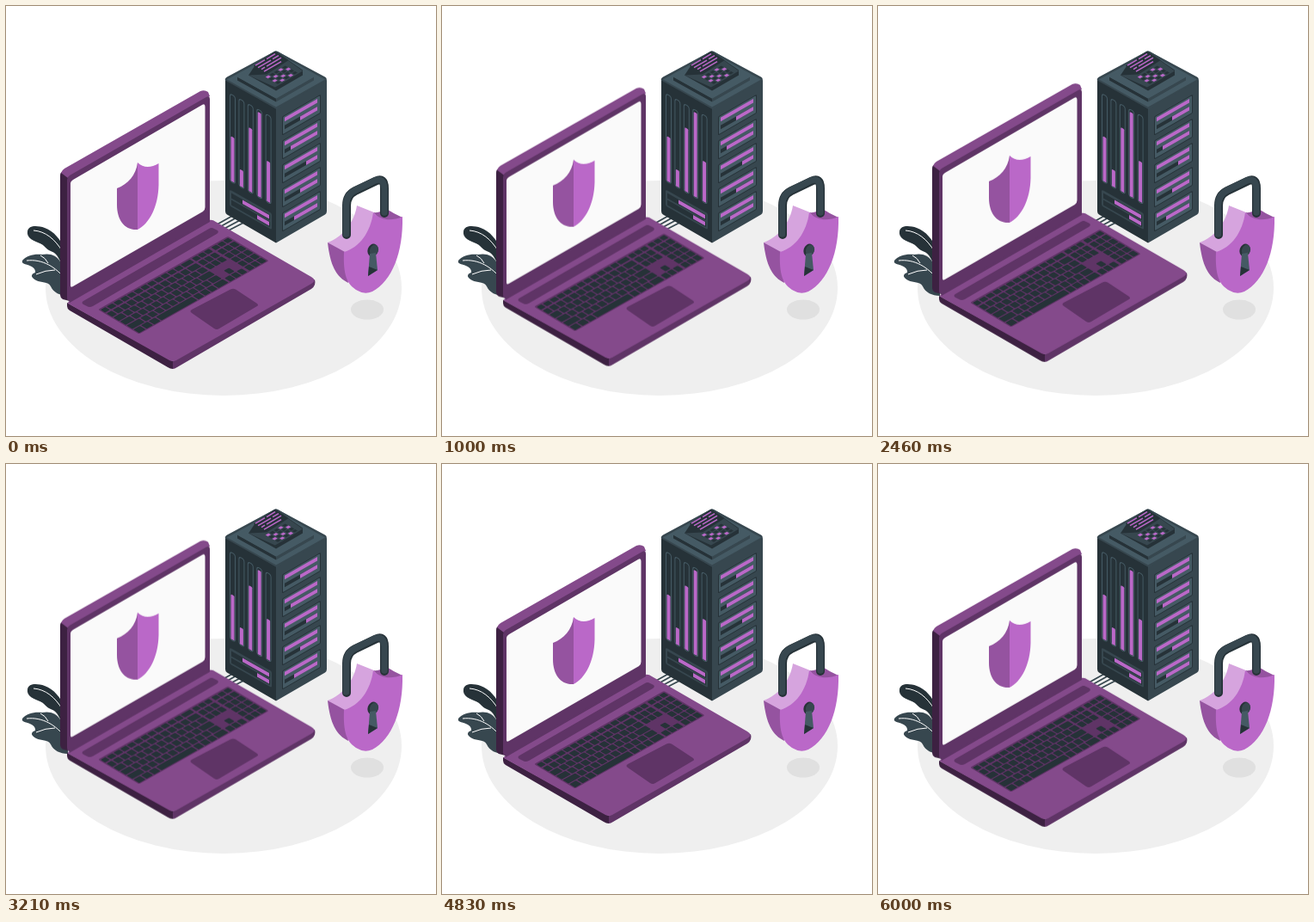
These frames come from a looping animation (500 px wide and 500 px high, 6040 ms). An HTML page:

```html
<!DOCTYPE html>
<html lang="en">
<head>
<meta charset="utf-8">
<title>Data protection</title>
<style>
  html, body { margin: 0; width: 100%; height: 100%; overflow: hidden; background: #fff; }
  svg { display: block; width: 100vw; height: 100vh; }
</style>
</head>
<body>
<svg viewBox="0 0 500 500">
  <ellipse cx="253" cy="328" rx="207" ry="125" fill="#efefef"/>

  <g id="plant">
    <path fill="#263238" d="M25 262C26 255 36 255 45 258C56 262 63 271 69 284V306C62 299 62 288 52 285C46 283 46 278 37 275C29 272 24 268 25 262Z"/>
    <path fill="#37474f" d="M19 296C24 290 33 288 42 289C51 287 59 290 63 297C68 302 71 309 72 316V337C63 337 55 333 52 326C49 320 41 322 35 319C29 316 28 312 34 310C35 305 29 302 25 301C21 300 18 299 19 296Z"/>
    <path fill="none" stroke="#fff" stroke-width="1" d="M32 261C46 262 57 271 66 286M24 296C42 294 58 303 70 319M40 290Q46 293 49 299M35 312Q46 307 57 307"/>
  </g>

  <path fill="none" stroke="#37474f" stroke-width="1.7" d="M240 257L265 243M243 260L270 245M247 262.500L275 247.500M251 265L280 250"/>

  <g id="server" transform="translate(0 .6)">
    <path fill="#455a64" d="M255 86L311 53Q314 51 317 53L373 86L314 121Z"/>
    <path fill="#263238" d="M255 87Q255 84 258 86L314 119V275L257 242Q255 241 255 238Z"/>
    <path fill="#37474f" d="M314 119L370 85Q373 84 373 87V238Q373 241 371 242L314 275Z"/>
    <path fill="#37474f" d="M255 86Q254 84 257 82L311 53Q314 51 317 53L371 82Q374 84 372 87L314 119Z"/>
    <path fill="#455a64" d="M257 85L314 54L371 85L314 117Z"/>
    <path fill="#263238" d="M269 82L314 107V111L269 86Z"/>
    <path fill="#37474f" d="M314 107L358 82V86L314 111Z"/>
    <path fill="#455a64" d="M269 82L314 57L358 82L314 107Z"/>
    <path fill="#263238" d="M282 80L290 68L313 52L345 74V80L314 98Z"/>
    <path fill="#37474f" d="M282 80L303 79L328 63L345 75L313 94Z"/>
    <path fill="#263238" d="M288 69L313 54L328 62L303 78Z"/>
    <path fill="none" stroke="#ba68c8" stroke-width="1.6" d="M290 68.500L301 62M303 61L313 55M293 71L308 62.500M310 61L317 57M297 73L301 70.500M303 69.500L320 59.500M300 75.500L320 64"/>
    <g id="pad" transform="matrix(.87 -.5 .87 .5 300 82)"></g>
    <g id="left" transform="matrix(1 .565 0 1 255 86)"></g>
    <g id="right" transform="matrix(1 -.575 0 1 314 119)"></g>
  </g>

  <g id="lock">
    <ellipse cx="420" cy="353" rx="19" ry="11.500" fill="#e0e0e0"/>
    <path fill="#9553a0" d="M427 240Q436 241 441 235Q450 241 461 246L440 254Z"/>
    <path fill="#d6a4de" d="M374 275C391 269 405 252 408 232L428 240C425 264 412 282 393 287Z"/>
    <path fill="#9553a0" d="M374 275L394 286L398 322C384 315 377 302 374 275Z"/>
    <path fill="#ba68c8" d="M393 286C411 281 424 263 427 240C436 250 449 250 461 245C462 286 449 320 426 332Q417 336 409 331C396 324 392 312 393 286Z"/>
    <path fill="none" stroke="#263238" stroke-width="10" stroke-linecap="round" d="M396 266V232Q396 220 406 215L430 203.500Q440 199 440 212V241"/>
    <path fill="none" stroke="#37474f" stroke-width="7.500" stroke-linecap="round" d="M395.500 265V231.500Q396 219 405.500 214.500L429 203Q439 199 440 212V240"/>
    <ellipse cx="426.500" cy="284" rx="6" ry="7.500" fill="#263238" transform="rotate(18 426.500 284)"/>
    <ellipse cx="428" cy="284" rx="5" ry="6.500" fill="#37474f" transform="rotate(18 428 284)"/>
    <path fill="#455a64" d="M423 288L421 314L432 307L430 287Z"/>
    <path fill="#263238" d="M422 303L421 314L432 307Z"/>
  </g>

  <g id="laptop">
    <path fill="#3d2142" d="M71 345L194 413V422Q191 422 188 420L74 354Q71 352 71 349Z"/>
    <path fill="#5f3466" d="M194 413L359 318Q361 325 355 329L199 420Q196 422 194 422Z"/>
    <path fill="#844a8b" d="M74 343L236 249Q240 248 244 251L355 315Q362 319 355 323L198 412Q194 414 190 412L74 347Q70 345 74 343Z"/>
    <path fill="#5f3466" d="M90 343L236 259Q239 257 242 259L246 261Q248 263 245 265L101 349Q97 351 94 349L90 347Q87 345 90 343Z"/>
    <path fill="#5f3466" d="M216 353L261 329.500Q264 328 267 329.500L292 346Q294 348 292 349L248 375Q245 377 242 375L216 357Q213 355 216 353Z"/>
    <g id="keys" transform="matrix(.868 -.49 .868 .52 107 353)"></g>

    <g id="lid" transform="translate(0 1)">
      <path fill="#5f3466" d="M72 336L237 241V250L74 344Z"/>
      <path fill="#fafafa" d="M73 201L233 110V235L73 327Z"/>
      <path fill="#3d2142" d="M63 196Q63 192 66 192L74 198V342L66 340Q63 338 63 335Z"/>
      <path fill="#844a8b" d="M64 193Q65 190 68 188L226 98Q231 96 235 99L237 104L72 199Z"/>
      <path fill="#5f3466" fill-rule="evenodd" d="M71 201Q71 198 74 196L231 106Q237 102 237 107V244Q237 247 234 249L75 341Q71 343 71 338ZM75 205V324Q75 327 78 325L229 238Q231.500 236 231.500 233V116Q231.500 112 228 114L78 201Q75 203 75 205Z"/>
      <path fill="#9553a0" d="M129 211C142 206 151 196 153 181V259C138 260 129 248 129 230Z"/>
      <path fill="#ba68c8" d="M153 181C160 188 169 187 177.500 182V207C177 232 167 252 153 259Z"/>
    </g>
  </g>
</svg>
<script>
  const $ = id => document.getElementById(id);
  const DARK = '#263238', SLATE = '#37474f', STEEL = '#455a64', PINK = '#ba68c8', PLUM = '#5f3466';

  function rect(parent, x, y, width, height, fill, rx = 0, stroke = 'none') {
    const el = document.createElementNS('http://www.w3.org/2000/svg', 'rect');
    const attrs = { x, y, width, height, fill, rx, stroke };
    for (const name in attrs) el.setAttribute(name, attrs[name]);
    parent.append(el);
  }

  // Server, left face: level meters and a status panel
  const left = $('left');
  [61, 93.5, 39, 15, 66].forEach((top, i) => {
    const x = 5.5 + i * 10.4;
    rect(left, x, 12, 6, 102, DARK, 3, STEEL);
    rect(left, x + 1, top, 4, 113 - top, PINK, 1);
  });
  rect(left, 5, 124, 49, 19, SLATE, 2);
  rect(left, 7, 127, 45, 6, DARK);
  rect(left, 7, 135, 45, 6, DARK);
  rect(left, 20, 127.5, 31, 4.5, PINK);
  rect(left, 37, 135.5, 14, 4.5, PINK);

  // Server, right face: five drive bays
  const right = $('right');
  [28, 17, 35, 28, 21].forEach((start, i) => {
    const y = 13 + i * 28;
    rect(right, 7, y, 45, 22, DARK, 1.5);
    rect(right, 8, y + 1, 43, 20, STEEL, 1);
    rect(right, 10, y + 3, 38, 4.5, PINK);
    rect(right, 10, y + 12, 38, 4.5, DARK);
    rect(right, start, y + 12, 48 - start, 4.5, PINK);
  });

  // Console keypad
  for (let row = 0; row < 4; row++)
    for (let col = 0; col < 5; col++)
      rect($('pad'), col * 5.6 + 1, row * 4.4 + 1, 4, 3.2,
        (col * 2 + row * 3) % 5 < 2 ? PINK : DARK);

  // Laptop keyboard
  const keys = $('keys');
  const key = (x, row, w) => rect(keys, x, row ? 1 + row * 9 : 2, w, row ? 7.7 : 6, DARK, 1);
  rect(keys, 0, 0, 174, 55, PLUM, 2);
  for (let row = 0; row < 6; row++) {
    const lead = [8, 8, 12, 14, 18, 10][row];
    key(1.5, row, lead - 1.5);
    let x = 1.5 + lead;
    if (row === 5) {
      for (let i = 0; i < 2; i++, x += 10) key(x, row, 8.6);
      key(x, row, 48);
      x += 49.5;
    }
    for (; x + 17 < 121; x += 9) key(x, row, 7.6);
    key(x, row, 121 - x);
    for (let i = 0; i < 3; i++)
      if (row < 3 || row === 5 || (row === 4 && i === 1)) key(123.5 + i * 8, row, 6.8);
    for (let i = 0; i < 3; i++) key(149.5 + i * 8, row, 6.8);
  }

  // The laptop floats up and back at constant speed
  $('laptop').animate(
    ['translateY(0)', 'translateY(-10px)', 'translateY(0)'].map(transform => ({ transform })),
    { duration: 6040, iterations: Infinity, easing: 'linear' }
  );
</script>
</body>
</html>
```
